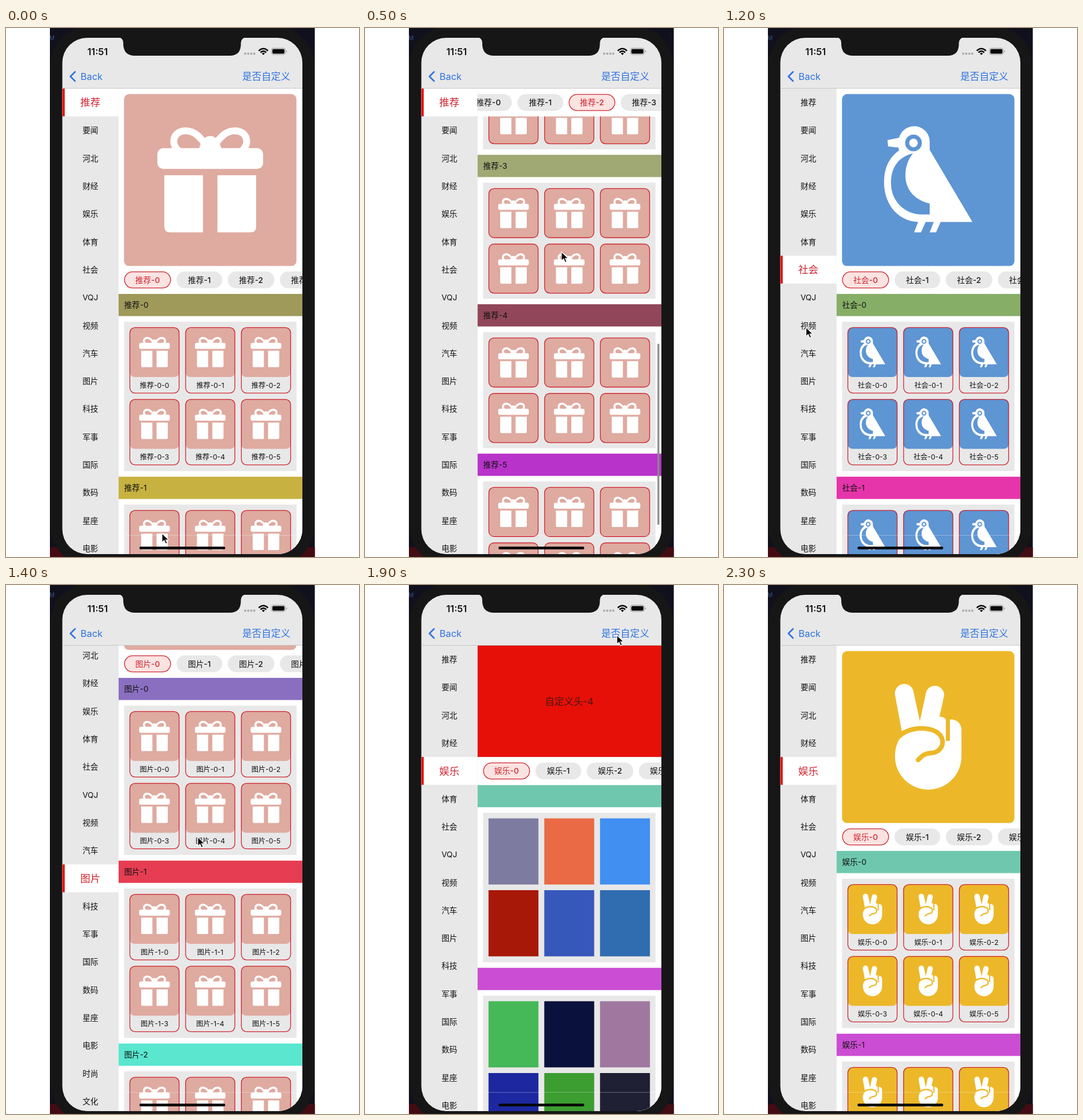
Animation, 611 px wide and 917 px high, one loop 2400 ms. Source, as an HTML page:

```html
<!DOCTYPE html>
<html lang="zh-CN">
<head>
<meta charset="utf-8">
<title>Category list</title>
<style>
html, body { margin: 0; width: 100%; height: 100%; overflow: hidden; background: #fff; }
svg { display: block; width: 100%; height: 100%; }
text { font-family: Inter, "Noto Sans CJK SC", "Noto Sans CJK", sans-serif; fill: #111; }
</style>
</head>
<body>
<svg viewBox="0 0 611 917" xmlns="http://www.w3.org/2000/svg">
  <defs>
    <clipPath id="stage"><rect x="76" width="458.5" height="917"/></clipPath>
    <clipPath id="screen"><rect x="97.5" y="17" width="415.5" height="895" rx="43"/></clipPath>
    <clipPath id="pane"><rect x="194.7" y="105" width="318.3" height="807"/></clipPath>
    <clipPath id="side"><rect x="97" y="105" width="97.7" height="807"/></clipPath>
    <symbol id="gift" viewBox="204.3 114.5 298.4 298">
      <rect x="262" y="208" width="183" height="36" rx="10" fill="#fff"/>
      <path d="M274 255H341V354H284Q274 354 274 344ZM366 255H433V344Q433 354 423 354H366Z" fill="#fff"/>
      <g fill="none" stroke="#fff" stroke-width="12">
        <path id="loop" d="M299 213C284 201 289 178 311 178C330 178 338 194 348 204"/>
        <use href="#loop" transform="matrix(-1 0 0 1 707 0)"/>
      </g>
      <path d="M334 209C338 195 344 187 353.500 187S369 195 373 209Z" fill="#fff"/>
    </symbol>
    <symbol id="bird" viewBox="204.3 114.5 298.4 298">
      <path d="M283 194L303 190A27 27 0 0 1 356 199V211L430 336H375L367 354H356L363 336H349L341 354H329L336 336C298 334 277 302 277 267C277 241 287 223 303 212L302 207L284 205Z" fill="#fff"/>
      <path d="M327 217C299 224 289 245 289 268C289 302 315 323 342 323H356V304C330 298 314 280 314 255C314 240 319 227 327 217Z" fill="#5e95d3"/>
      <circle cx="328" cy="199" r="11" fill="none" stroke="#5e95d3" stroke-width="7"/>
    </symbol>
    <symbol id="hand" viewBox="204.3 114.5 298.4 298">
      <path d="M296 190A16 16 0 0 1 328 185L339 236L350 185A16 16 0 0 1 381 191L373 228Q384 227 387 240V233C402 231 411 239 411 251V297A57.500 57.500 0 0 1 296 297Q296 274 309 260Z" fill="#fff"/>
      <g fill="none" stroke="#ecb829" stroke-width="8">
        <path d="M303 262C321 246 350 245 367 254C386 265 380 290 358 291C346 292 343 296 336 303" stroke-linecap="round"/>
        <path d="M387.500 230V270" stroke-width="7"/>
      </g>
    </symbol>
  </defs>
  <g clip-path="url(#stage)">
    <rect x="76" width="459" height="917" fill="#10111c"/>
    <rect x="76" y="900" width="459" height="17" fill="#430c12"/>
    <text x="75" y="21" font-size="10" style="fill:#36547f">M</text>
    <rect x="77" y="-3" width="456.500" height="935" rx="68" fill="#161617"/>
  </g>
  <g clip-path="url(#screen)">
    <rect x="97" y="17" width="417" height="896" fill="#e8e8e8"/>
    <g id="app"></g>
    <path d="M97 104.500H513" stroke="#c6c6c6"/>
    <path d="M195 879.500H513" stroke="#fff" stroke-opacity=".3"/>
    <rect x="231" y="899" width="148.500" height="4.800" rx="2.400" fill="#080808"/>
  </g>
  <path d="M194 16Q203 17 203 26V29Q204 48 223 48H387Q406 48 406.500 29V26Q407 17 416 16Z" fill="#161617"/>
  <g id="bars"></g>
  <g fill="#aaa"><circle cx="414" cy="44.500" r="1.900"/><circle cx="419.300" cy="44.500" r="1.900"/><circle cx="424.600" cy="44.500" r="1.900"/><circle cx="429.700" cy="44.500" r="1.900"/></g>
  <g fill="none" stroke="#080808" stroke-width="2.500">
    <path d="M437.500 39.500Q445.500 32 453.500 39.500M440.500 42.500Q445.500 37.800 450.500 42.500"/>
    <path d="M443.300 44.300Q445.500 42.500 447.700 44.300L445.500 46.200Z" stroke-width="1" fill="#080808"/>
  </g>
  <rect x="459.500" y="35" width="24" height="11" rx="3.200" fill="none" stroke="#999"/>
  <rect x="461" y="36.500" width="21" height="8" rx="2" fill="#080808"/>
  <path d="M485 39V42.500Q486.500 42 486.500 40.700T485 39Z" fill="#999"/>
  <path d="M119.500 76L111.500 84L119.500 92" fill="none" stroke="#2f73e0" stroke-width="2.500" stroke-linecap="round" stroke-linejoin="round"/>
  <path id="cursor" d="M0 0V15.500L3.700 12.200L6.500 18.300L9.200 17.100L6.500 11.200H11.500Z" fill="#080808" stroke="#fff" stroke-width="1.100"/>
</svg>
<script>
const GRAY = '#e8e8e8', RED = '#cf2430', BLUE = '#2f73e0';
const ROW = 48.31, STEP = 100, LOOP = 2400;
const names = '推荐 要闻 河北 财经 娱乐 体育 社会 VQJ 视频 汽车 图片 科技 军事 国际 数码 星座 电影 时尚 文化'.split(' ');
const fills = { gift: '#dfaaa0', bird: '#5e95d3', hand: '#ecb829' };
const tabs = {
  0: { icon: 'gift', bands: ['#9f9a5a', '#c7b241', '#6a8fb0', '#a0a873', '#914759', '#b833ca'] },
  1: { icon: 'bird', bands: ['#60683d', '#6ab262'] },
  4: { icon: 'hand', bands: ['#6fc8ad', '#cb4dd3'] },
  6: { icon: 'bird', bands: ['#87ae67', '#e635aa'] },
  10: { icon: 'gift', bands: ['#8a6fc0', '#e63d52', '#5ae6cf', '#6a3f4d'] }
};
const swatches = [
  ['#7d7ca0', '#e96a45', '#418ff0', '#a81808', '#3758bb', '#306cb0'],
  ['#45b858', '#0a113d', '#a0789f', '#1d28a0', '#3c9d30', '#1f2033']
];

// One state per step: tab, scroll, cursor position, custom cells
const states = [
  [0, 0, 270, 876], [0, 130, 300, 720], [0, 420, 325, 560], [0, 800, 337, 450], [0, 1060, 340, 400],
  [0, 1134, 340, 388], [0, 1134, 340, 388], [0, 1134, 340, 388], [0, 1134, 240, 270], [1, 0, 150, 180],
  [1, 0, 154, 307], [4, 0, 148, 415], [6, 0, 142, 519], [10, 0, 144, 610], [10, 300, 332, 437],
  [10, 625, 255, 310], [10, 625, 163, 211], [4, 0, 170, 215], [4, 0, 340, 130], [4, 0, 436, 87, true],
  [4, 0, 436, 87, true], [4, 0, 436, 87], [4, 0, 480, 60], [4, 0]
];

const $ = id => document.getElementById(id);
const rect = (x, y, w, h, fill, r = 0, more = '') =>
  `<rect x="${x}" y="${y}" width="${w}" height="${h}" rx="${r}" fill="${fill}" ${more}/>`;
const label = (s, x, y, size, { fill = '#111', anchor = 'middle', weight = 400 } = {}) =>
  `<text x="${x}" y="${y}" dy=".37em" font-size="${size}" font-weight="${weight}" text-anchor="${anchor}" style="fill:${fill}">${s}</text>`;
const picture = (icon, x, y, size) => rect(x, y, size, size, fills[icon], 9) +
  `<use href="#${icon}" x="${x}" y="${y}" width="${size}" height="${size}"/>`;

function sidebar(active) {
  const shift = Math.max(0, 129 + ROW * active - 508.5);
  return names.map((name, i) => {
    const y = 129 + ROW * i - shift, on = i === active;
    return (on ? rect(97, y - ROW / 2, 98, ROW, '#fff') + rect(97, y - ROW / 2, 4.7, ROW, '#e51310') : '') +
      label(name, 146, y, on ? 17.4 : 13.6, { fill: on ? RED : '#111' });
  }).join('');
}

function chips(name, active, y) {
  let x = 204.5 - (active >= 2 ? 31.3 : 0);
  return rect(194.7, y, 319, ROW, '#fff') + [81, 79, 80.5, 80.5, 81, 81].map((w, i) => {
    const on = i === active;
    const chip = rect(x + .6, y + 10.1, w - 1.2, 28, on ? '#fbe3e1' : GRAY, 14, `stroke="${on ? RED : GRAY}" stroke-width="1.3"`) +
      label(`${name}-${i}`, x + w / 2, y + 24.1, 13.7, { fill: on ? RED : '#111', weight: 500 });
    x += w + 9.7;
    return chip;
  }).join('');
}

function section(tab, i, y, custom) {
  const { icon, bands } = tabs[tab], name = `${names[tab]}-${i}`;
  const tall = i < 2, cellH = tall ? 114.7 : 86.4, pitch = cellH + 9.8;
  let out = rect(194.7, y, 319, 38.6, bands[i]) + rect(204.3, y + 48.3, 298.5, tall ? 259 : 201.3, GRAY);
  if (!custom) out += label(name, 204.5, y + 19.5, 13.6, { anchor: 'start' });
  for (let k = 0; k < 6; k++) {
    const x = 213.8 + 96.5 * (k % 3), top = y + 57.9 + pitch * Math.floor(k / 3);
    if (custom) { out += rect(x, top, 86.4, cellH, swatches[i][k]); continue; }
    out += picture(icon, x, top, 86.4) +
      rect(x + .6, top + .6, 85.2, cellH - 1.2, 'none', 9, `stroke="${RED}" stroke-width="1.3"`);
    if (tall) out += label(`${name}-${k}`, x + 43.2, top + 100.3, 12.2);
  }
  return out;
}

function pane(tab, scroll, custom) {
  const stripY = custom ? 298.3 : 412.5;
  let out = rect(194.7, 105, 319, 808, '#fff');
  out += custom
    ? rect(194.7, 105, 319, 193.3, '#e61008') + label('自定义头-4', 353.5, 202, 16.5, { fill: '#4a1512' })
    : picture(tabs[tab].icon, 204.3, 114.5 - scroll, 298.4);
  let y = stripY + ROW - scroll, active = 0;
  tabs[tab].bands.forEach((_, i) => {
    if (y <= 154) active = i;
    if (y < 917 && y > -220) out += section(tab, i, y, custom);
    y += i < 2 ? 317 : 259;
  });
  out += chips(names[tab], active, Math.max(105, stripY - scroll));
  if (tab === 0 && scroll) out += rect(506.2, 105 + scroll * .39, 3.2, 314, '#8b8b8b', 1.6);
  return out;
}

$('bars').innerHTML = label('11:51', 158.5, 41, 16.2, { weight: 600 }) +
  label('Back', 129, 84, 16.4, { fill: BLUE, anchor: 'start' }) +
  label('是否自定义', 450.5, 84, 16.6, { fill: BLUE, weight: 500 });

let shown = -1;
function draw(now) {
  const step = Math.floor(now % LOOP / STEP);
  if (step !== shown) {
    shown = step;
    const [tab, scroll, x, y, custom] = states[step];
    $('app').innerHTML = `<g clip-path="url(#side)">${sidebar(tab)}</g><g clip-path="url(#pane)">${pane(tab, scroll, custom)}</g>`;
    $('cursor').setAttribute('visibility', x === undefined ? 'hidden' : 'visible');
    if (x !== undefined) $('cursor').setAttribute('transform', `translate(${x} ${y})`);
  }
}
const start = performance.now();
function tick() {
  draw(performance.now() - start);
  requestAnimationFrame(tick);
}
tick();
</script>
</body>
</html>
```
